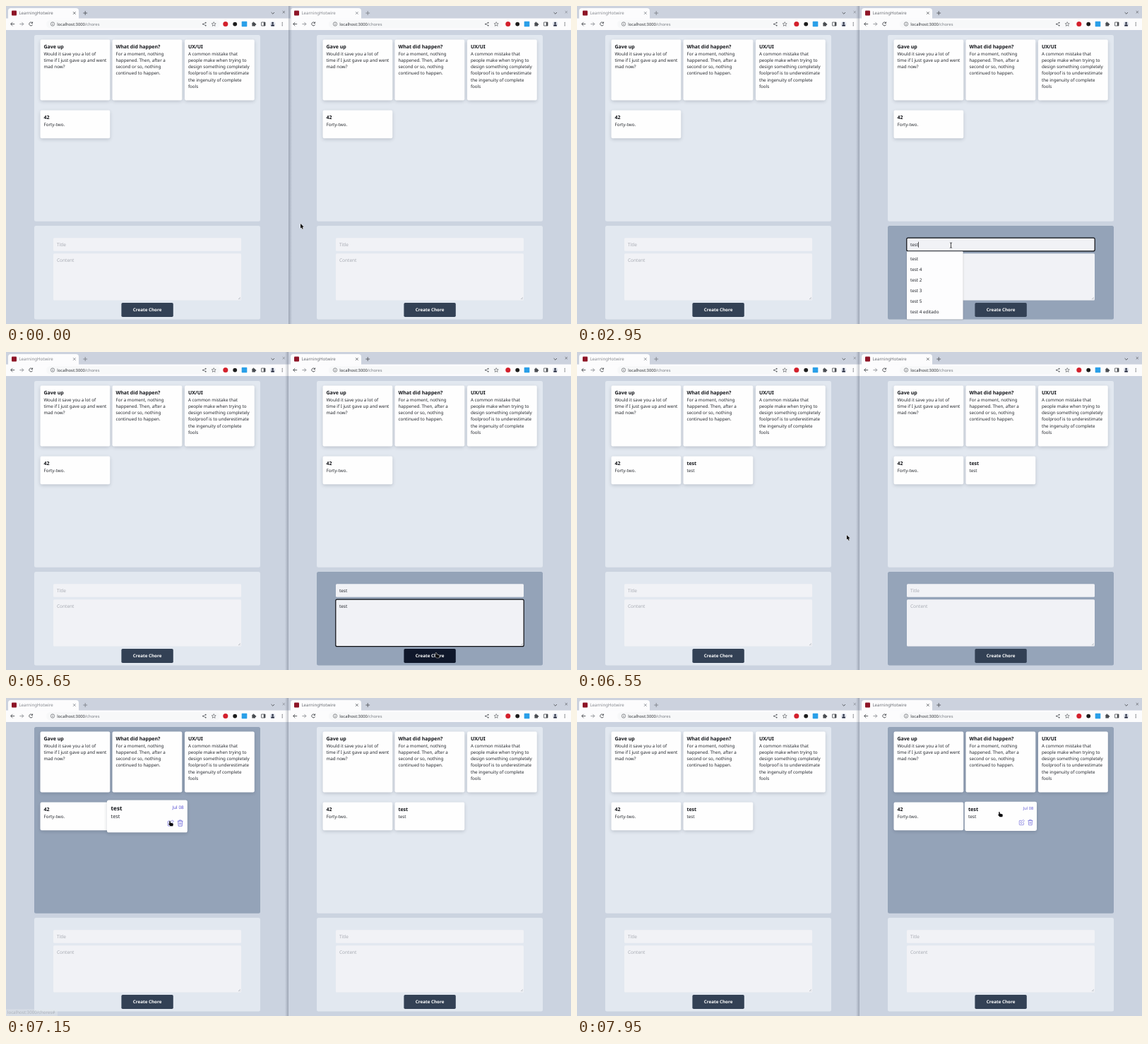
An HTML page with a canvas for the animation above (8 s loop, 800 by 450 pixels).

```html
<!DOCTYPE html>
<html lang="en">
<head>
<meta charset="utf-8">
<title>LearningHotwire</title>
<style>
  html, body { margin: 0; width: 100%; height: 100%; overflow: hidden; background: #cbd5e1; }
  canvas { display: block; width: 800px; height: 450px; }
</style>
</head>
<body>
<canvas id="stage"></canvas>
<script>
const LOOP = 8000;
const FONT = '"Noto Sans", "Open Sans", sans-serif';
const LIGHT = [226, 232, 240], DARK = [148, 163, 184];
const BTN = [51, 65, 85], BTN_HOVER = [15, 23, 42];

const canvas = document.getElementById('stage');
const dpr = window.devicePixelRatio || 1;
canvas.width = 800 * dpr;
canvas.height = 450 * dpr;
const c = canvas.getContext('2d');
c.scale(dpr, dpr);
c.textRendering = 'geometricPrecision';

const cards = [
  { x: 48.5, y: 47.5, h: 86, title: 'Gave up',
    body: ['Would it save you a lot of', 'time if I just gave up and went', 'mad now?'] },
  { x: 150.5, y: 47.5, h: 86, title: 'What did happen?',
    body: ['For a moment, nothing', 'happened. Then, after a', 'second or so, nothing', 'continued to happen.'] },
  { x: 253, y: 47.5, h: 86, title: 'UX/UI',
    body: ['A common mistake that', 'people make when trying to', 'design something completely',
           'foolproof is to underestimate', 'the ingenuity of complete', 'fools'] },
  { x: 48.5, y: 147.5, h: 39.7, title: '42', body: ['Forty-two.'] }
];
const newCard = { x: 150.5, y: 147.5, h: 39.7, title: 'test', body: ['test'] };
const CARD_W = 98.8;

// Pointer stops: time, x, y of the hot spot
const path = [
  [200, 417, 308], [900, 505.5, 338], [2900, 505.5, 338], [2950, 529.5, 338.5],
  [3000, 529.5, 338.5], [3450, 645, 386], [5200, 645, 386], [5550, 609, 425.5],
  [6300, 609, 425.5], [6700, 278.5, 183], [6880, 232, 174], [7150, 232, 174],
  [7560, 577, 139], [7720, 590, 139], [7930, 598, 161]
];
const hidden = [[1950, 2950], [4200, 5200]];
const titleKeys = [1950, 2250, 2500, 2750];
const bodyKeys = [4200, 4500, 4700, 5000];

const clamp = v => Math.max(0, Math.min(1, v));
const smooth = v => v * v * (3 - 2 * v);
const within = (v, a, b) => v >= a && v < b;

// cubic-bezier(.4, 0, .2, 1)
function ease(x) {
  x = clamp(x);
  let lo = 0, hi = 1, s = x;
  for (let i = 0; i < 20; i++) {
    s = (lo + hi) / 2;
    const q = 1 - s;
    if (1.2 * q * q * s + 0.6 * q * s * s + s * s * s < x) lo = s; else hi = s;
  }
  return s * s * (3 - 2 * s);
}
const hover = (t, on, off, dur) => ease((t - on) / dur) - ease((t - off) / dur);
const mix = (a, b, k) => `rgb(${a.map((v, i) => Math.round(v + (b[i] - v) * k)).join()})`;

function text(str, x, y, size, color, weight = 400, align = 'left') {
  c.font = `${weight} ${size}px ${FONT}`;
  c.fillStyle = color;
  c.textAlign = align;
  c.fillText(str, x, y);
  return c.measureText(str).width;
}
function box(x, y, w, h, r, fill) {
  c.beginPath();
  c.roundRect(x, y, w, h, r);
  c.fillStyle = fill;
  c.fill();
}
function dot(x, y, r, fill) {
  c.beginPath();
  c.arc(x, y, r, 0, 7);
  c.fillStyle = fill;
  c.fill();
}
function line(d, color, w = 0.8) {
  c.strokeStyle = color;
  c.lineWidth = w;
  c.stroke(new Path2D(d));
}
function shadow(color, blur, dy) {
  c.shadowColor = color;
  c.shadowBlur = blur * dpr;
  c.shadowOffsetY = dy * dpr;
}

function browser(active) {
  const ink = '#4a4d52', soft = active ? '#55585e' : '#7d828a';
  box(0, 0, 400, 34, 0, '#ccd2de');
  box(3, 3, 100, 18, [4, 4, 0, 0], '#fcfcfd');
  box(0, 17.5, 400, 16.5, 0, '#fcfcfd');
  box(8, 6.5, 7, 7, 1, '#8e1527');
  text('LearningHotwire', 18.4, 12.2, 6.15, active ? '#6b6e74' : '#85888e');
  line('M95 8.2l3.6 3.6m0 -3.6l-3.6 3.6', soft);
  line('M109.3 10h5.8m-2.9 -2.9v5.8', soft, 0.9);
  line('M375.6 9l2.2 2.2l2.2 -2.2', ink, 0.9);
  line('M391.7 7l3.2 3.2m0 -3.2l-3.2 3.2', soft, 0.7);

  box(57, 20, 246, 11.4, 5.7, '#f7f8f9');
  line('M12.2 25.5h-5.4m2.5 -2.6l-2.6 2.6l2.6 2.6', ink, 0.9);
  line('M19.4 25.5h5.4m-2.5 -2.6l2.6 2.6l-2.6 2.6', '#8d9096', 0.9);
  line('M37.2 23.8a2.5 2.5 0 1 0 .4 2.6M37.6 22.4v2h-2', ink, 0.9);
  line('M68.7 25.5a2.7 2.7 0 1 1 -5.4 0a2.7 2.7 0 1 1 5.4 0M66 25v2M66 23.7v.7', ink, 0.6);
  const w = text('localhost:3000', 72.3, 27.7, 5.85, '#303338');
  text('/chores', 72.3 + w, 27.7, 5.85, '#777b82');

  line('M279 25.6l3.6 -1.9M279 25.6l3.6 1.9', ink, 0.6);
  dot(279, 25.6, 0.9, ink); dot(282.7, 23.6, 0.9, ink); dot(282.7, 27.6, 0.9, ink);
  line('M294.2 22.6l.9 2l2.1 .2l-1.6 1.4l.5 2.1l-1.9 -1.1l-1.9 1.1l.5 -2.1l-1.6 -1.4l2.1 -.2z', ink, 0.6);
  dot(310.8, 25.5, 3.5, '#d3202c');
  dot(324.2, 25.6, 2.9, '#1c1c1c');
  box(333.7, 21.8, 7.6, 7.4, 0.6, '#2a9fe8');
  box(348.4, 23.8, 4.6, 4.6, 0.5, ink);
  dot(350.4, 23.5, 1.1, ink); dot(353.2, 26, 1.1, ink);
  line('M361.6 23h5.4v5h-5.4z', ink, 0.8);
  box(364.8, 23, 2.2, 5, 0, ink);
  dot(377.6, 25.5, 3.7, '#dfe3ec');
  dot(377.6, 24.2, 1.4, '#2c3144');
  box(375.2, 26, 4.8, 2.5, [2, 2, 0.6, 0.6], '#2c3144');
  for (const y of [23.3, 25.5, 27.7]) dot(391.2, y, 0.65, ink);
}

function drawCard(card, k = 0, fade = 0) {
  const { x, y, h } = card, s = 1 + 0.157 * k;
  const mx = x + CARD_W / 2, my = y + h / 2;
  c.save();
  c.translate(mx, my);
  c.scale(s, s);
  c.translate(-mx, -my);
  shadow('rgba(30,41,59,.2)', 5, 1.8);
  box(x, y, CARD_W, h, 2.2, '#fefefe');
  shadow('transparent', 0, 0);
  text(card.title, x + 4.9, y + 12.8, 7, '#111318', 600);
  card.body.forEach((row, i) => text(row, x + 4.9, y + 22.4 + i * 9.17, 6.27, '#25282e'));
  if (fade > 0) {
    const ink = '#5750d3';
    c.globalAlpha = fade;
    text('Jul 08', x + 94.3, y + 11.2, 5.5, ink, 400, 'right');
    c.translate(x + 78, y + 28.3);
    line('M0 -2.6h-2.4a.7 .7 0 0 0 -.7 .7v4.6a.7 .7 0 0 0 .7 .7h4.6a.7 .7 0 0 0 .7 -.7v-2.3' +
         'M-1 1.2v-1.6l3.3 -3.3l1.5 1.5l-3.3 3.4z', ink, 0.6);
    c.translate(12, 0);
    line('M-3.3 -2.5h6.6M-1.3 -2.5v-1.1h2.6v1.1M-2.6 -2.5l.4 6.1h4.4l.4 -6.1M-.8 -.8v2.8M.8 -.8v2.8', ink, 0.6);
  }
  c.restore();
}

function field(y, h, value, hint, focused, caret) {
  box(67, y, 266, h, 1.5, '#f1f2f6');
  const base = y + 11.6;
  let w = 0;
  if (value) w = text(value, 72, base, 6.35, '#22252b');
  else text(hint, 72, base, 6.5, '#a8abb3');
  if (focused) {
    c.beginPath();
    c.roundRect(66.8, y - 0.1, 266.4, h + 0.2, 2);
    c.strokeStyle = '#0d0e12';
    c.lineWidth = 1.2;
    c.stroke();
  }
  if (caret) {
    c.fillStyle = '#111';
    c.fillRect(72 + w, base - 6.2, 0.7, 8);
  }
}

function page(p) {
  box(40, 41, 320, 263.7, 2.5, mix(LIGHT, DARK, p.list));
  box(40, 311, 320, 132.5, 2.5, mix(LIGHT, DARK, p.form));
  cards.forEach(card => drawCard(card));
  if (p.added) drawCard(newCard, p.card, p.fade);

  field(328.3, 18.4, p.title, 'Title', p.focus === 'title', p.focus === 'title' && p.caret);
  field(350.2, 66.4, p.body, 'Content', p.focus === 'body', p.focus === 'body' && p.caret);
  line('M329 415l2.8 -2.8M330.6 415.2l1.3 -1.3', '#8d929c', 0.5);
  box(163.4, 420, 73.4, 20, 1.8, mix(BTN, BTN_HOVER, p.button));
  text('Create Chore', 200.1, 432.4, 6.25, '#fff', 600, 'center');

  if (p.options) {
    shadow('rgba(0,0,0,.25)', 2, 0.5);
    box(67, 347.2, 79.6, 96.4, 0.8, '#fdfdfe');
    shadow('transparent', 0, 0);
    p.options.forEach((o, i) => text(o, 72, 359.9 + i * 15, 6.3, '#22252b'));
  }
}

function side(x, active, p) {
  c.save();
  c.beginPath();
  c.rect(x, 0, 400, 450);
  c.clip();
  c.translate(x, 0);
  box(0, 0, 400, 450, 0, '#cbd3e0');
  browser(active);
  page(p);
  c.restore();
}

function seam(rightActive) {
  const from = 400, to = rightActive ? 395 : 405;
  const g = c.createLinearGradient(from, 0, to, 0);
  g.addColorStop(0, 'rgba(40,50,70,.28)');
  g.addColorStop(1, 'rgba(40,50,70,0)');
  c.fillStyle = g;
  c.fillRect(Math.min(from, to), 0, 5, 450);
}

function pointerAt(t) {
  let a = path[0];
  for (const b of path) {
    if (t < b[0]) {
      const k = b === a ? 0 : smooth((t - a[0]) / (b[0] - a[0]));
      return [a[1] + (b[1] - a[1]) * k, a[2] + (b[2] - a[2]) * k];
    }
    a = b;
  }
  return [a[1], a[2]];
}

function pointer(t) {
  if (hidden.some(([a, b]) => within(t, a, b))) return;
  const [x, y] = pointerAt(t), px = x % 400;
  const onCard = t > 6100 && within(px, 150, 250) && within(y, 147, 188);
  const onButton = within(px, 163, 237) && within(y, 420, 440);
  const onField = within(px, 67, 333) && (within(y, 328, 347) || within(y, 350, 417));
  c.save();
  c.translate(x, y);
  c.lineJoin = 'round';
  if (onField) {
    const beam = 'M-1.5 -3.6q1.5 0 1.5 1v5.4q0 1 -1.5 1M1.5 -3.6q-1.5 0 -1.5 1M0 2.8q0 1 1.5 1';
    line(beam, 'rgba(255,255,255,.6)', 1.6);
    line(beam, '#15161a', 0.8);
  } else {
    const d = onCard || onButton
      ? 'M-.8 .5q.8 -1 1.5 0v2l3 .7q1.3 .3 1.1 1.6l-.5 2.4h-3.8l-2.3 -2.8q.2 -1 1 -.5z'
      : 'M0 0v6.7l1.5 -1.4l1.1 2.5l1.2 -.5l-1.1 -2.5h2.1z';
    line(d, '#fff', 1);
    c.fillStyle = '#0b0b0d';
    c.fill(new Path2D(d));
  }
  c.restore();
}

function status(t) {
  const a = 0.45 * (clamp((t - 7050) / 100) - clamp((t - 7220) / 150));
  if (a <= 0) return;
  c.globalAlpha = a;
  box(0, 440.5, 73, 9.5, [0, 2, 0, 0], '#e3e6ea');
  text('localhost:3000/chores#', 1.8, 447.2, 6.2, '#7b8088');
  c.globalAlpha = 1;
}

const typed = (t, keys) => 'test'.slice(0, keys.filter(k => t >= k).length);

function draw(t) {
  const focus = within(t, 1100, 3450) ? 'title' : within(t, 3450, 6000) ? 'body' : '';
  const resets = [1100, 3450, ...titleKeys, ...bodyKeys].filter(k => k <= t);
  const since = t - Math.max(0, ...resets);
  const added = t >= 6100;
  const words = ['test', 'test 4', 'test 2', 'test 3', 'test 5', 'test 4 editado'];
  const options = within(t, 1100, 3450)
    ? (t < 1950 ? [...words].reverse() : words) : null;
  const active = t >= 1050;

  side(0, !active, {
    list: hover(t, 6590, 7330, 300), form: 0, button: 0, added,
    card: hover(t, 6760, 7220, 500), fade: hover(t, 6760, 7220, 250),
    title: '', body: ''
  });
  side(400, active, {
    list: hover(t, 7350, 9000, 300), form: hover(t, 430, 6530, 300),
    button: hover(t, 5420, 6340, 250), added,
    card: hover(t, 7830, 9000, 500), fade: hover(t, 7830, 9000, 180),
    title: added ? '' : typed(t, titleKeys),
    body: added ? '' : typed(t, bodyKeys),
    focus, caret: since % 1000 < 500, options
  });
  seam(active);
  status(t);
  pointer(t);
}

const start = performance.now();
function tick() {
  draw((performance.now() - start) % LOOP);
  requestAnimationFrame(tick);
}
tick();
</script>
</body>
</html>
```
